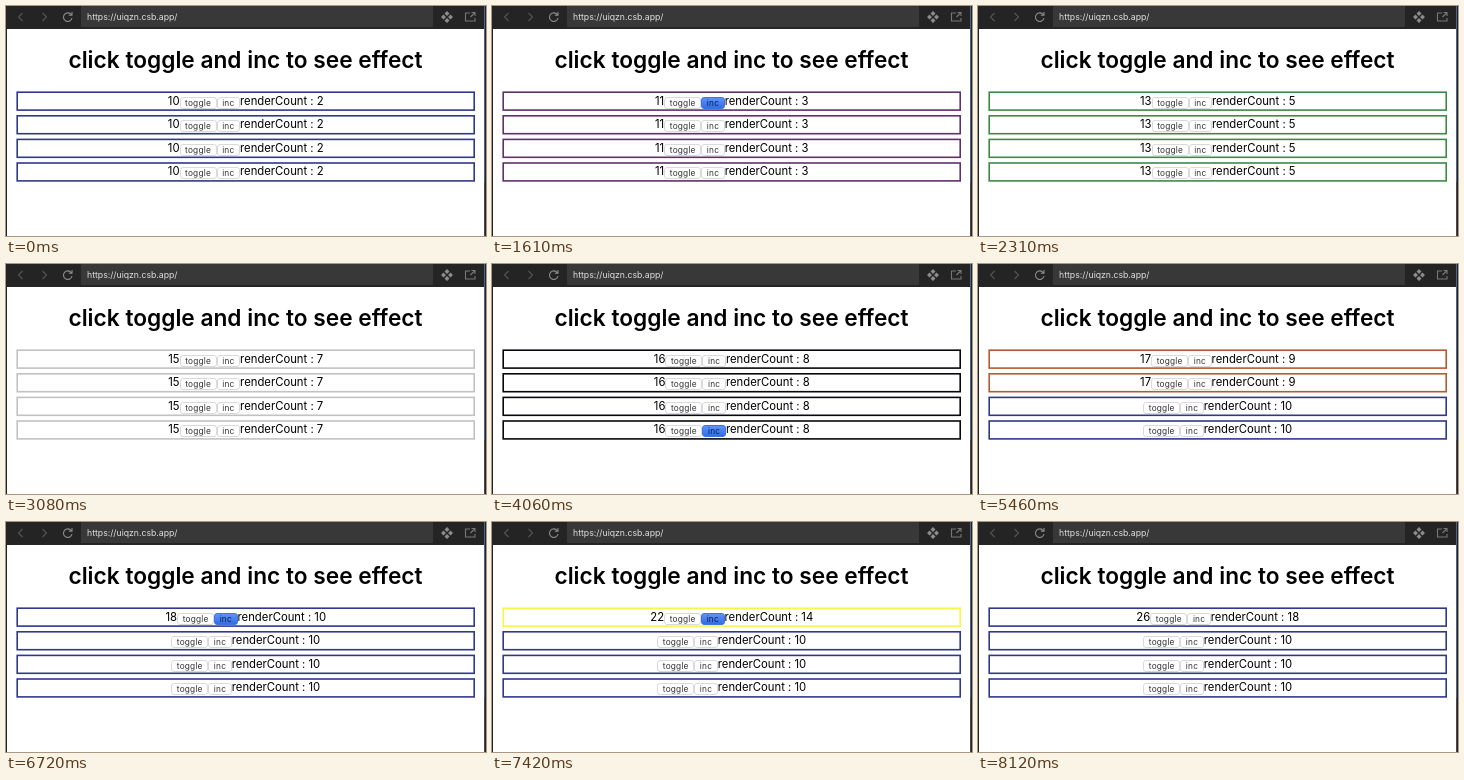
Recreate the animation shown at these times as an HTML page. Size 480 by 230 pixels, loop 8.4 s.

```html
<!DOCTYPE html>
<html lang="en">
<head>
<meta charset="utf-8">
<title>Toggle and inc</title>
<style>
  html, body { margin: 0; width: 100%; height: 100%; overflow: hidden; background: #fff; }
  body { position: relative; color: #000; font-family: Inter, sans-serif; }
  #stage { position: absolute; left: 0; top: 0; width: 480px; height: 230px; overflow: hidden; }
  svg { position: absolute; left: 0; top: 0; width: 480px; height: 230px; }
  .url { font: 8.7px Inter, sans-serif; fill: #e2e2e2; }
  h1 { position: absolute; left: 0; top: 36px; width: 479px; margin: 0; text-align: center; white-space: nowrap;
       font-size: 22.7px; font-weight: 600; line-height: 36px; }
  .row { position: absolute; left: 11px; width: 457.5px; height: 19.5px; display: flex; justify-content: center;
         align-items: center; white-space: pre; font-size: 11.3px; line-height: 15px; }
  .btn { box-sizing: border-box; height: 12px; margin-top: 3px; border: 1px solid #dadada; border-radius: 3px;
         background: #fff; color: #333; font-size: 8.3px; line-height: 10.5px; letter-spacing: .2px; text-align: center; }
  .toggle { width: 37px; }
  .inc { width: 23.5px; }
  .btn.down { background: linear-gradient(#5f93f4, #336ce8); border-color: #3f74e0; color: #0b1c4a; }
</style>
</head>
<body>
<div id="stage">
  <svg id="art" viewBox="0 0 480 230">
    <path fill="#242424" d="M0 0h480v23H0zM0 23h1v207H0zM479 23h1v207h-1z"/>
    <path fill="#383838" d="M75 0h352v21H75z"/>
    <path fill="#46658f" d="M478 0h1v176h-1z"/>
    <path fill="#4a4a4e" d="M478 176h1v54h-1z"/>
    <g fill="none" stroke="#8c8c8c" stroke-width="1.1">
      <path d="M16.500 7l-4 4 4 4M36.500 7l4 4-4 4" stroke="#555"/>
      <path d="M65.300 8.700A4.300 4.300 0 1 0 66 12M66 6v3.200h-3.200"/>
      <path d="M464 7h-4.500v8h9.500v-3M465.500 6.500h3.500v3.500M469 6.500l-4.500 4.500" stroke="#777"/>
    </g>
    <path fill="#8c8c8c" d="M441 5l2.500 2.500-2.500 2.500-2.500-2.500zM441 12l2.500 2.500-2.500 2.500-2.500-2.500zM437.500 8.500l2.500 2.500-2.500 2.500-2.500-2.500zM444.500 8.500l2.500 2.500-2.500 2.500-2.500-2.500z"/>
    <text class="url" x="81" y="14">https://uiqzn.csb.app/</text>
  </svg>
  <h1>click toggle and inc to see effect</h1>
</div>
<script>
const LOOP = 8400, HOLD = 70;
const COLORS = ['#08080c', '#b45a32', '#2f388a', '#5f3069', '#d83a34', '#3c8a48', '#faf648', '#c2c2c2'];

// [mouse down time, row, button]; the click takes effect on release
const CLICKS = [
  [1120, 0, 'inc'], [1610, 0, 'inc'], [2170, 1, 'inc'], [2520, 1, 'inc'],
  [3010, 2, 'inc'], [3710, 2, 'inc'], [4060, 3, 'inc'],
  [4760, 3, 'toggle'], [5250, 2, 'toggle'], [5740, 1, 'toggle'],
  ...[6370, 6720, 6930, 7070, 7210, 7420, 7630, 7840, 8050].map(t => [t, 0, 'inc'])
];

const stage = document.getElementById('stage');
const art = document.getElementById('art');

function add(parent, cls, text = '') {
  const el = document.createElement('span');
  el.className = cls;
  el.textContent = text;
  return parent.appendChild(el);
}

function addFrame(y) {
  const rect = document.createElementNS('http://www.w3.org/2000/svg', 'rect');
  const attrs = { x: 11.2, y, width: 457, height: 17.9, fill: 'none', 'stroke-width': 1.6 };
  for (const name in attrs) rect.setAttribute(name, attrs[name]);
  return art.appendChild(rect);
}

const rows = [0, 1, 2, 3].map(i => {
  const top = 85.4 + 23.6 * i;
  const box = document.createElement('div');
  box.className = 'row';
  box.style.top = top + 'px';
  stage.appendChild(box);
  return {
    frame: addFrame(top + 0.8),
    value: add(box, 'value'),
    toggle: add(box, 'btn toggle', 'toggle'),
    inc: add(box, 'btn inc', 'inc'),
    label: add(box, 'label')
  };
});

function stateAt(t) {
  let count = 10, down = '';
  const items = rows.map(() => ({ shown: true, renders: 2 }));
  for (const [start, row, kind] of CLICKS) {
    if (t < start) break;
    if (t < start + HOLD) { down = kind + row; break; }
    if (kind === 'inc') {
      count++;
      for (const item of items) if (item.shown) item.renders++;
    } else {
      items[row].shown = !items[row].shown;
      items[row].renders++;
    }
  }
  return { count, down, items };
}

let last = '';
function draw(now) {
  const state = stateAt(now % LOOP);
  const key = JSON.stringify(state);
  if (key === last) return;
  last = key;
  rows.forEach((r, i) => {
    const { shown, renders } = state.items[i];
    r.frame.setAttribute('stroke', COLORS[renders % COLORS.length]);
    r.value.textContent = shown ? state.count : '';
    r.label.textContent = 'renderCount : ' + renders;
    for (const kind of ['toggle', 'inc']) r[kind].classList.toggle('down', state.down === kind + i);
  });
}

const begin = performance.now();
function tick() {
  draw(performance.now() - begin);
  requestAnimationFrame(tick);
}
tick();
</script>
</body>
</html>
```
